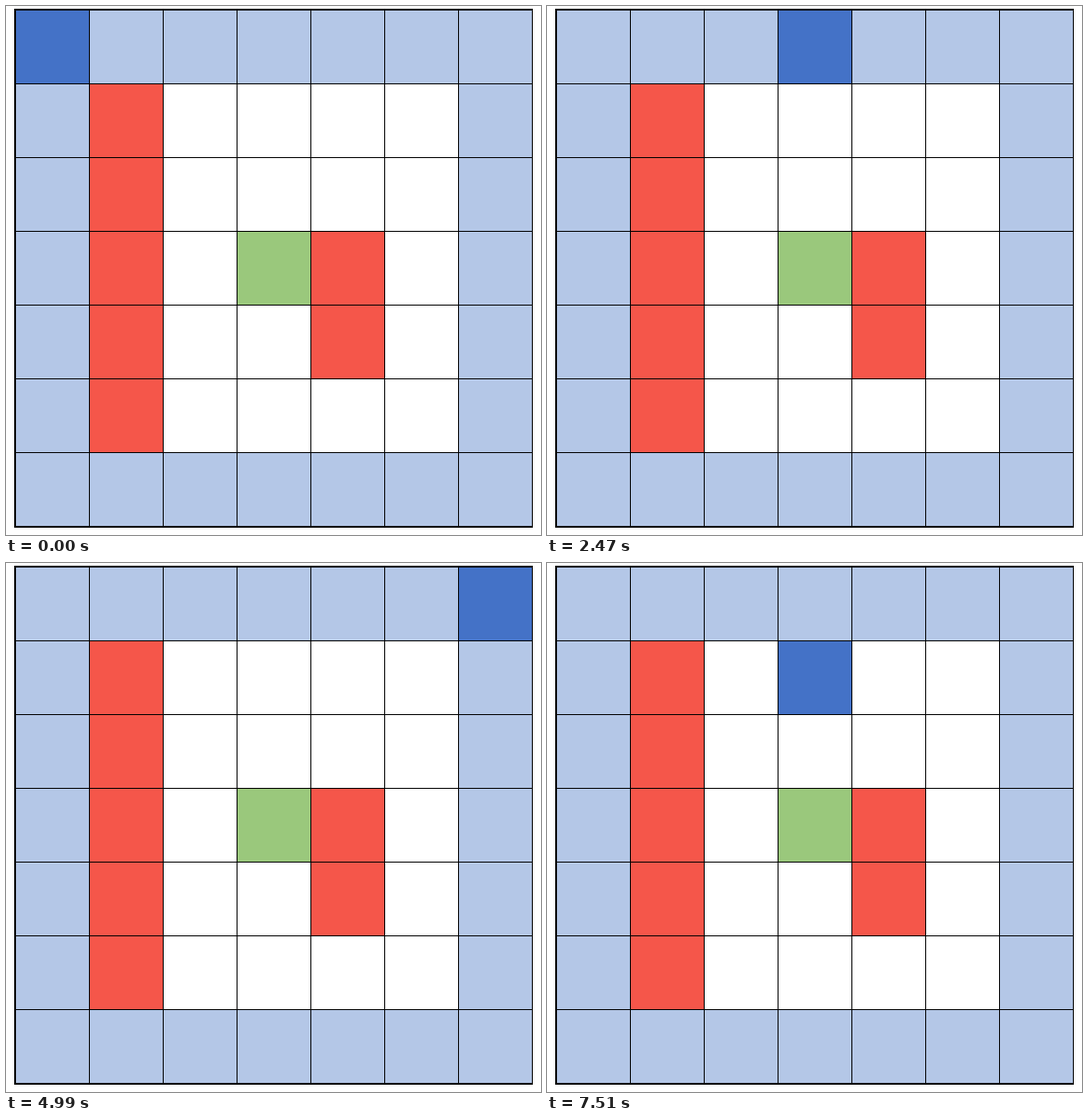
Animation of 587x581 px, one loop 8000 ms. Source, as an HTML page:

```html
<!DOCTYPE html>
<html lang="en">
<head>
<meta charset="utf-8">
<title>Grid scan</title>
<style>
  html, body { margin: 0; width: 100%; height: 100%; overflow: hidden; background: #fff; }
  svg { display: block; width: 587px; height: 581px; shape-rendering: crispEdges; }
  .edge { fill: #b4c7e7; }
  .wall { fill: #f5564a; }
  .goal { fill: #9ac87c; }
  .cursor { fill: #4472c7; animation: scan 8000ms step-end infinite; }

  /* Row by row, one cell each 840 ms, skipping walls */
  @keyframes scan {
    0%       { transform: translate(0, 0); }
    9.875%   { transform: translate(81px, 0); }
    20.375%  { transform: translate(162px, 0); }
    30.875%  { transform: translate(243px, 0); }
    41.375%  { transform: translate(324px, 0); }
    51.875%  { transform: translate(405px, 0); }
    62.375%  { transform: translate(486px, 0); }
    72.875%  { transform: translate(0, 81px); }
    83.375%  { transform: translate(162px, 81px); }
    93.875%, 100% { transform: translate(243px, 81px); }
  }
</style>
</head>
<body>
<svg viewBox="0 0 587 581">
  <g transform="translate(10 4)">
    <rect class="edge" width="567" height="567"/>
    <rect x="81" y="81" width="405" height="405" fill="#fff"/>
    <rect class="wall" x="81" y="81" width="81" height="405"/>
    <rect class="wall" x="324" y="243" width="81" height="162"/>
    <rect class="goal" x="243" y="243" width="81" height="81"/>
    <rect class="cursor" width="81" height="81"/>
    <path stroke="#000" fill="none" d="M81.5 0v567m81-567v567m81-567v567m81-567v567m81-567v567m81-567v567
      M0 81.5h567m-567 81h567m-567 81h567m-567 81h567m-567 81h567m-567 81h567"/>
    <path d="M-1-1H568V569H-1ZM1 1V567H567V1Z" fill-rule="evenodd"/>
  </g>
</svg>
</body>
</html>
```
